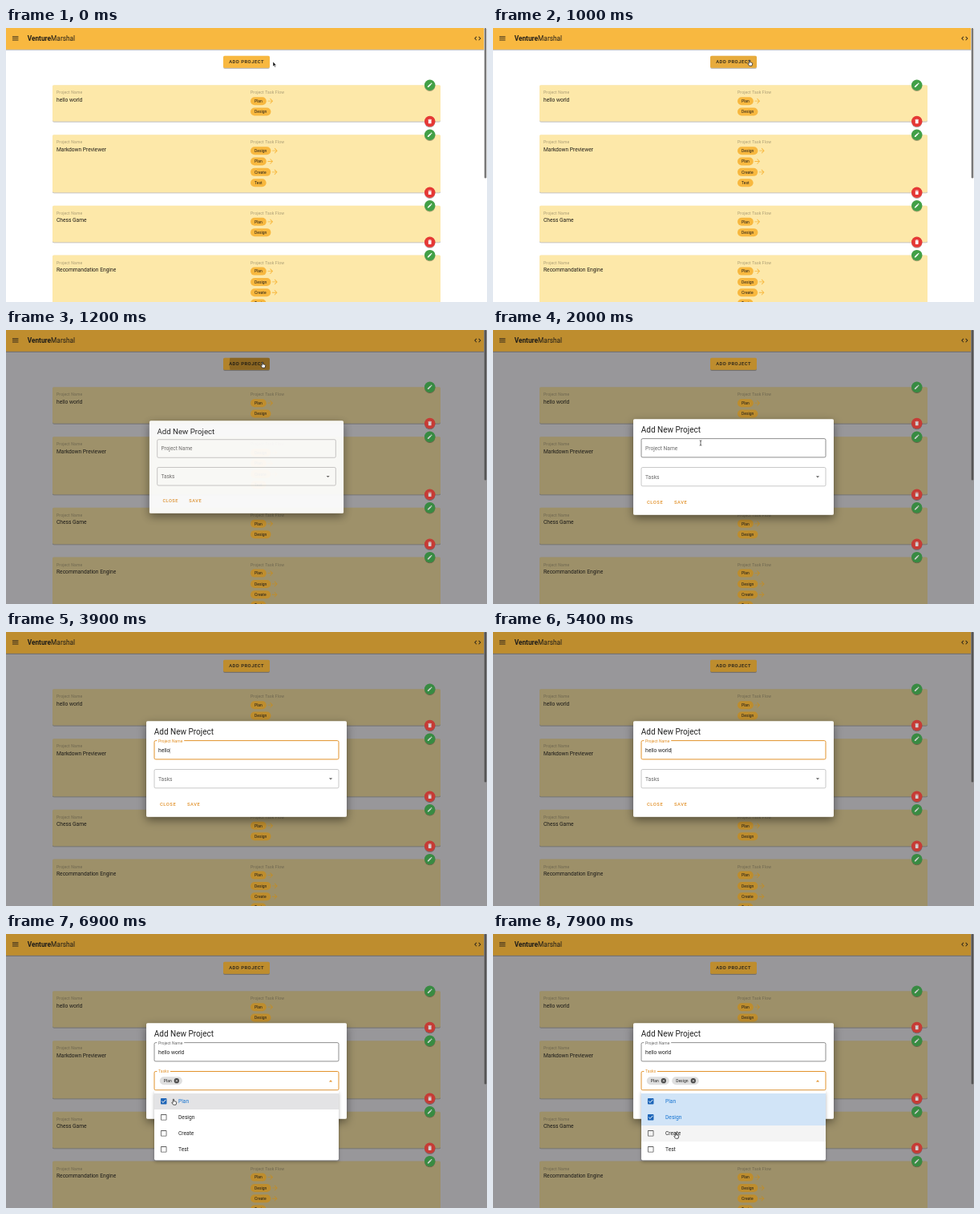
Recreate the animation shown at these times as an HTML page. Size 600 by 342 pixels, loop 8 s.

```html
<!DOCTYPE html>
<html lang="en">
<head>
<meta charset="utf-8">
<title>VentureMarshal</title>
<style>
html, body { margin: 0; width: 100%; height: 100%; overflow: hidden; background: #fff; }
svg { display: block; width: 100vw; height: 100vh; font: 6.67px Roboto, Arial, sans-serif; cursor: default; }
text { white-space: pre; }
path { fill-rule: evenodd; }
.btn { font-size: 5.83px; font-weight: 500; letter-spacing: .0892em; }
.cap { font-size: 5px; letter-spacing: .0333em; }
.chip { font-size: 5px; }
</style>
</head>
<body>
<svg viewBox="0 0 600 342" preserveAspectRatio="none">
  <defs>
    <filter id="low" x="-20%" y="-20%" width="140%" height="150%"><feDropShadow dx="0" dy=".8" stdDeviation=".7" flood-opacity=".42"/></filter>
    <filter id="high" x="-20%" y="-20%" width="140%" height="150%"><feDropShadow dx="0" dy="4" stdDeviation="6" flood-opacity=".45"/></filter>
    <filter id="mid" x="-10%" y="-10%" width="120%" height="130%"><feDropShadow dx="0" dy="2" stdDeviation="2" flood-opacity=".3"/></filter>
    <clipPath id="button"><rect x="271" y="34.8" width="58" height="15" rx="1.7"/></clipPath>
  </defs>
  <g id="page"></g>
  <g id="live"></g>
</svg>
<script>
const LOOP = 8000;
const OPEN = 1050, FOCUS = 2450, TYPE = 3180, KEY = 172, MENU = 6050;
const PICKS = [6600, 7500];
const TASKS = ['Plan', 'Design', 'Create', 'Test'];
const CHIP_TEXT = { Plan: 9.8, Design: 15.4, Create: 15.2, Test: 9.6 };
const ORANGE = '#e2922b', BLUE = '#1976d2';

// Page colours: plain, and behind the open dialog
const SHADES = {
  bg: ['#ffffff', '#98979a'],
  card: ['#fde8a9', '#9d9069'],
  amber: ['#f8b83f', '#be8d2d'],
  green: ['#43a047', '#388b43'],
  red: ['#e53935', '#c63a36'],
  icon: ['#ffffff', '#d0cfd0'],
  ink: ['#201d17', '#1c1b19'],
  label: ['#a99c74', '#6d6650'],
  thumb: ['#777777', '#555555'],
};

const ICONS = {
  menu: 'M3 6H21V8H3ZM3 11H21V13H3ZM3 16H21V18H3Z',
  code: 'M14.6 16.6L19.2 12L14.6 7.4L16 6L22 12L16 18ZM9.4 16.6L4.8 12L9.4 7.4L8 6L2 12L8 18Z',
  pencil: 'M20.7 7Q21.3 6.3 20.7 5.6L18.4 3.3Q17.7 2.7 17 3.3L15.1 5.1L18.9 8.9ZM3 17.2V21H6.8L17.8 9.9L14 6.2Z',
  trash: 'M19 4H15.5L14.5 3H9.5L8.5 4H5V6H19ZM6 19A2 2 0 0 0 8 21H16A2 2 0 0 0 18 19V7H6Z',
  arrow: 'M4 11V13H16L10.5 18.5L12 20L19.9 12L12 4L10.5 5.5L16 11Z',
  down: 'M7 10L12 15L17 10Z',
  up: 'M7 15L12 10L17 15Z',
  box: 'M19 3H5A2 2 0 0 0 3 5V19A2 2 0 0 0 5 21H19A2 2 0 0 0 21 19V5A2 2 0 0 0 19 3ZM19 5V19H5V5Z',
  checked: 'M19 3H5A2 2 0 0 0 3 5V19A2 2 0 0 0 5 21H19A2 2 0 0 0 21 19V5A2 2 0 0 0 19 3ZM10 17L5 12L6.4 10.6L10 14.2L17.6 6.6L19 8Z',
  clear: 'M12 2A10 10 0 1 0 12 22A10 10 0 1 0 12 2ZM17 15.6L15.6 17L12 13.4L8.4 17L7 15.6L10.6 12L7 8.4L8.4 7L12 10.6L15.6 7L17 8.4L13.4 12Z',
};

const clamp = v => Math.max(0, Math.min(1, v));
const lerp = (a, b, p) => a + (b - a) * p;

// cubic-bezier(.25, .8, .25, 1)
function ease(x) {
  x = clamp(x);
  let lo = 0, hi = 1, u = x;
  for (let i = 0; i < 22; i++) {
    u = (lo + hi) / 2;
    const bx = .75 * u * (1 - u) * (1 - u) + .75 * u * u * (1 - u) + u ** 3;
    if (bx < x) lo = u; else hi = u;
  }
  return 2.4 * u * (1 - u) ** 2 + 3 * u * u * (1 - u) + u ** 3;
}

const rect = (x, y, w, h, fill, more = '') =>
  `<rect x="${x}" y="${y}" width="${w}" height="${h}" fill="${fill}" ${more}/>`;
const text = (x, y, s, fill, more = '') => `<text x="${x}" y="${y}" fill="${fill}" ${more}>${s}</text>`;
const icon = (name, x, y, size, fill) =>
  `<path d="${ICONS[name]}" fill="${fill}" transform="translate(${x} ${y}) scale(${size / 24}) translate(-12 -12)"/>`;

function fab(y, color, name) {
  return `<circle cx="528.7" cy="${y}" r="6.7" fill="var(--${color})" filter="url(#low)"/>` +
    icon(name, 528.7, y, 7.5, 'var(--icon)');
}

function card(top, name, tasks) {
  const h = 18.7 + tasks.length * 13.33;
  let s = rect(58, top, 484, h, 'var(--card)', 'rx="1.7" filter="url(#low)"') +
    text(63, top + 11, 'Project Name', 'var(--label)', 'class="cap"') +
    text(305, top + 11, 'Project Task Flow', 'var(--label)', 'class="cap"') +
    text(63, top + 20.6, name, 'var(--ink)');
  tasks.forEach((task, i) => {
    const y = top + 20 + i * 13.33, w = CHIP_TEXT[task] + 10;
    s += rect(305, y - 5, w, 10, 'var(--amber)', 'rx="5"') +
      text(310, y + 1.8, task, 'var(--ink)', 'class="chip"');
    if (i < tasks.length - 1) s += icon('arrow', 305 + w + 5, y, 10, 'var(--amber)');
  });
  return s + fab(top, 'green', 'pencil') + fab(top + h, 'red', 'trash');
}

page.innerHTML = rect(0, 0, 600, 342, 'var(--bg)') +
  card(71.2, 'hello world', ['Plan', 'Design']) +
  card(133.2, 'Markdown Previewer', ['Design', 'Plan', 'Create', 'Test']) +
  card(221.8, 'Chess Game', ['Plan', 'Design']) +
  card(283.6, 'Recommandation Engine', TASKS) +
  rect(-5, -5, 610, 31.7, 'var(--amber)', 'filter="url(#low)"') +
  icon('menu', 11.7, 13.1, 10, 'var(--ink)') +
  text(26.7, 16, '<tspan font-weight="700">Venture</tspan>Marshal', 'var(--ink)', 'font-size="8.33"') +
  icon('code', 588.3, 13.1, 10, 'var(--ink)') +
  rect(596.2, 0, 3.8, 342, 'var(--bg)') +
  rect(596.7, 0, 2.6, 187.5, 'var(--thumb)', 'rx="1.3"') +
  rect(271, 34.8, 58, 15, 'var(--amber)', 'rx="1.7" filter="url(#low)"') +
  text(278.2, 44.4, 'ADD PROJECT', 'var(--ink)', 'class="btn"');

// Pointer stops: time, x, y
const PATH = [[0, 333, 42], [350, 333, 42], [800, 320, 42], [1250, 320, 42], [1850, 259, 141],
  [5500, 259, 141], [5950, 214, 183], [6150, 214, 183], [6450, 209, 208], [7050, 209, 208],
  [7350, 223, 228], [7580, 223, 228], [7820, 228, 250], [LOOP, 228, 250]];

function pointerAt(t) {
  const i = PATH.findIndex((k, n) => n && t <= k[0]);
  const [t0, x0, y0] = PATH[i - 1], [t1, x1, y1] = PATH[i];
  const p = (t - t0) / (t1 - t0), s = p * p * (3 - 2 * p);
  return [lerp(x0, x1, s), lerp(y0, y1, s)];
}

function pointer(t, x, y) {
  if (t > TYPE && t < 5500) return '';
  const inButton = t < 1300 && x < 329;
  const inField = t > 1600 && y > 135 && y < 159;
  const inMenu = t > 5700 && y > 171;
  let shape = '<path d="M0 0V6L1.4 4.8L2.4 7L3.4 6.5L2.4 4.4H4.2Z" fill="#111" stroke="#fff" stroke-width=".5"/>';
  if (inField) shape = '<path d="M-1.3-3.2Q0-3.2 0-2.2Q0-3.2 1.3-3.2M0-2.2V2.2M-1.3 3.2Q0 3.2 0 2.2Q0 3.2 1.3 3.2" fill="none" stroke="#222" stroke-width=".7"/>';
  else if (inButton || inMenu) shape = '<path d="M-.7-1.6Q0-2.4.6-1.6V.7L3 1.3Q4 1.6 3.7 2.8L3 5.2H-.3L-2.2 2.6Q-1.9 1.6-.7 2.4Z" fill="#fff" stroke="#111" stroke-width=".7"/>';
  return `<g transform="translate(${x} ${y})">${shape}</g>`;
}

// Outlined field; lift moves the label into the border
function field(y, label, labelWidth, lift, focused, hovered) {
  const border = focused ? ORANGE : hovered ? '#333' : '#9a9a9a';
  const gap = (labelWidth * .75 + 3.5) * lift;
  return rect(185, y, 230, 23.3, 'none', `rx="1.7" stroke="${border}" stroke-width="${focused ? 1 : .55}"`) +
    rect(188.3 + (1 - lift) * 8, y - 1, gap, 2, '#fff') +
    text(190, lerp(y + 14, y + 1.9, lift), label, focused ? ORANGE : '#6c6c6c', `font-size="${lerp(6.67, 5, lift)}"`);
}

function dialog(t, y) {
  const p = ease((t - OPEN) / 300);
  if (!p) return '';
  const typed = 'hello world'.slice(0, Math.max(0, Math.floor((t - TYPE) / KEY) + 1));
  const nameFocus = t >= FOCUS && t < MENU, taskFocus = t >= MENU;
  const lastKey = t < TYPE ? FOCUS : TYPE + KEY * (typed.length - 1);
  const caret = nameFocus && (t - lastKey) % 1060 < 530;
  let s = rect(175, 111.3, 250, 119.4, '#fff', 'rx="1.7" filter="url(#high)"') +
    text(184.8, 128.4, 'Add New Project', '#222', 'font-size="10"') +
    field(135.6, 'Project Name', 40.5, ease((t - FOCUS) / 300), nameFocus, t > 1750) +
    text(190, 149.5, typed + (caret ? '<tspan dx="-.4" font-weight="300">|</tspan>' : ''), '#222') +
    field(171.5, 'Tasks', 17.6, ease((t - MENU) / 300), taskFocus, false) +
    icon(taskFocus ? 'up' : 'down', 405, 183.2, 10, taskFocus ? ORANGE : '#666') +
    text(192, 216.9, 'CLOSE', ORANGE, 'class="btn"') +
    text(226, 216.9, 'SAVE', ORANGE, 'class="btn"');
  let x = 191.8;
  PICKS.forEach((at, i) => {
    if (t < at) return;
    const w = CHIP_TEXT[TASKS[i]];
    s += rect(x, 178.2, w + 18.2, 10, '#dedede', 'rx="5"') +
      text(x + 5, 185, TASKS[i], '#222', 'class="chip"') +
      icon('clear', x + w + 11.2, 183.2, 7.5, '#444');
    x += w + 21.6;
  });
  return `<g opacity="${p}" transform="translate(300 171) scale(${lerp(.5, 1, p)}) translate(-300 -171)">${s}</g>` + menuList(t, y);
}

function menuList(t, pointerY) {
  const p = ease((t - MENU) / 300);
  if (!p) return '';
  let s = rect(185, 195.7, 230, 86.6, '#fff', 'rx="1.7" filter="url(#mid)"');
  TASKS.forEach((task, i) => {
    const y = 199 + i * 20, on = t >= PICKS[i], hover = pointerY >= y && pointerY < y + 20;
    const fill = on ? (hover ? '#e3e3e5' : '#d1e4f7') : hover ? '#f4f4f4' : '#fff';
    s += rect(185, y, 230, 20, fill) +
      icon(on ? 'checked' : 'box', 196.7, y + 9.8, 10, on ? '#1d65b8' : '#5c5c5c') +
      text(215, y + 12.2, task, on ? BLUE : '#222');
  });
  return `<g opacity="${p}">${s}</g>`;
}

function ripple(t, x) {
  let s = t < 1500 && x < 329 ? rect(271, 34.8, 58, 15, '#000', 'rx="1.7" opacity=".07"') : '';
  if (t > 1000 && t < 1600) {
    const r = 50 * ease((t - 1000) / 600) * clamp((t - 1000) / 180);
    const fade = .22 * (1 - clamp((t - 1250) / 350));
    s += `<circle cx="320" cy="42" r="${r}" opacity="${fade}" clip-path="url(#button)"/>`;
  }
  return s;
}

function draw(now) {
  const t = now % LOOP, [x, y] = pointerAt(t);
  const dim = ease((t - OPEN) / 200) * 100;
  for (const [name, [plain, dark]] of Object.entries(SHADES))
    page.style.setProperty('--' + name, `color-mix(in srgb, ${dark} ${dim}%, ${plain})`);
  live.innerHTML = ripple(t, x) + dialog(t, y) + pointer(t, x, y);
}

const page0 = performance.now();
function tick() {
  draw(performance.now() - page0);
  requestAnimationFrame(tick);
}
tick();
</script>
</body>
</html>
```
